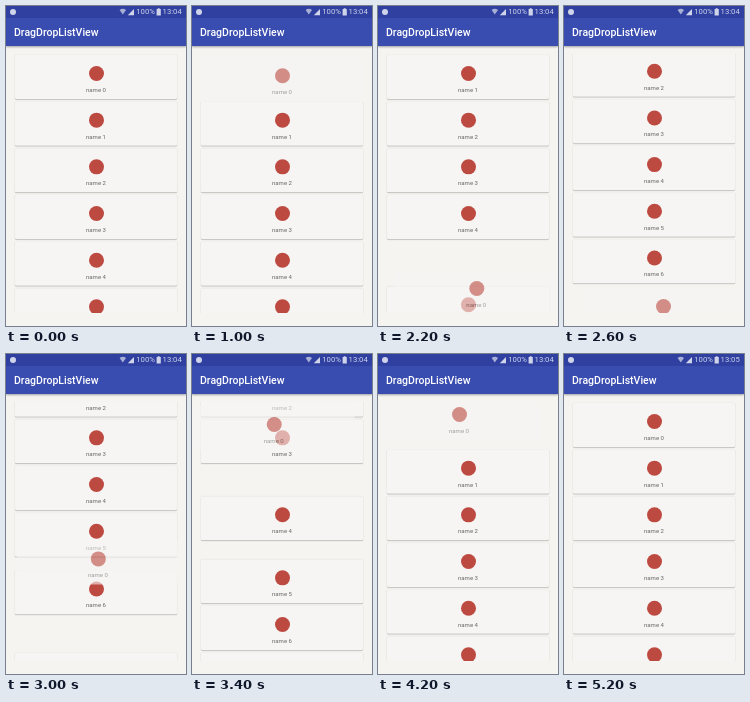
Animation of 180 by 320 pixels, one loop 5400 ms. Source, as an HTML page:

```html
<!DOCTYPE html>
<html lang="en">
<head>
<meta charset="utf-8">
<title>DragDropListView</title>
<style>
  html, body { margin: 0; width: 100%; height: 100%; overflow: hidden; }
  body { position: relative; background: #f5f4f1; font-family: Roboto, Arial, sans-serif; }
  .status, .bar, .list, .card, .status span, svg { position: absolute; }
  .status { left: 0; top: 0; width: 180px; height: 12px; background: #3040a0; z-index: 2; }
  .status span { top: 0; font-size: 7.7px; line-height: 12px; color: #cfd4ea; white-space: nowrap; }
  .status svg { left: 0; top: 0; }
  .bar {
    left: 0; top: 12px; width: 172px; height: 28px; padding-left: 8px; z-index: 1;
    background: #394caf; color: #fff; font-size: 10.5px; font-weight: 500; line-height: 29px;
    box-shadow: 0 1px 2px rgba(0, 0, 0, .35);
  }
  .list { left: 0; top: 48px; width: 180px; height: 259px; overflow: hidden; }
  .card {
    left: 9px; top: 0; width: 162px; height: 44px; border-radius: 1px; background: #f6f5f3;
    box-shadow: 0 .5px 1px rgba(0, 0, 0, .36);
  }
  .card i {
    position: absolute; left: 73.5px; top: 10.5px; width: 15px; height: 15px;
    border-radius: 50%; background: #bd4a41;
  }
  .card b {
    position: absolute; left: 0; top: 31px; width: 162px; text-align: center;
    font-size: 6px; font-weight: 400; line-height: 8px; color: #666;
  }
  .held { opacity: .6; box-shadow: none; }
</style>
</head>
<body>
<div class="status">
  <svg width="180" height="12" fill="#cfd4ea">
    <circle cx="7" cy="6" r="3"/>
    <path d="M113.6 4Q116.8 1.6 120 4L116.8 8.6Z" opacity=".75"/>
    <path d="M128 3v6.2h-6.2z"/>
    <path d="M151.8 2.2h1.8v.8h1.2v6.6h-4.2V3h1.2z"/>
  </svg>
  <span style="left:130.3px">100%</span>
  <span id="clock" style="left:156.6px">13:04</span>
</div>
<div class="bar">DragDropListView</div>
<div class="list" id="list"></div>
<script>
const LOOP = 5400, STEP = 200;
const PITCH = 46.67, TOP = 1, COUNT = 9, LAST_PASSED = 6;
const GRAB = 800, DROP = 4600;
const MAX_SCROLL = 77;

const list = document.getElementById('list');
const clock = document.getElementById('clock');

function addCard(n, extra = '') {
  const el = document.createElement('div');
  el.className = 'card ' + extra;
  el.innerHTML = `<i></i><b>name ${n}</b>`;
  list.append(el);
  return el;
}

const cards = Array.from({ length: COUNT }, (_, n) => addCard(n));
const held = addCard(0, 'held');

const ramp = (t, start, length) => Math.min(1, Math.max(0, (t - start) / length));
const ease = (...span) => (1 - Math.cos(Math.PI * ramp(...span))) / 2;

// neighbours make room one after another, up first and then back down
function shiftOf(n, t) {
  if (n < 1 || n > LAST_PASSED) return 0;
  const up = ease(t, 1333 + 210 * (n - 1), 200);
  const down = ease(t, 3800 - 173 * (n - 1), 200);
  return (down - up) * PITCH;
}

function place(el, x, y) {
  el.style.transform = `translate(${x}px, ${y}px)`;
}

function draw(t) {
  const scroll = MAX_SCROLL * (ramp(t, 2200, 630) - ramp(t, 3400, 520));
  cards.forEach((el, n) => place(el, 0, TOP + n * PITCH + shiftOf(n, t) - scroll));

  const out = ease(t, 970, 1500), back = ease(t, 2600, 920);
  place(held, 9 * out - 18 * back, 3 + 231 * out - 240 * back);

  const dragging = t >= GRAB && t < DROP;
  cards[0].style.visibility = dragging ? 'hidden' : 'visible';
  held.style.visibility = dragging ? 'visible' : 'hidden';
  clock.textContent = t >= DROP ? '13:05' : '13:04';
}

const begin = performance.now();
function tick() {
  const t = (performance.now() - begin) % LOOP;
  draw(Math.floor(t / STEP) * STEP);
  requestAnimationFrame(tick);
}
tick();
</script>
</body>
</html>
```
